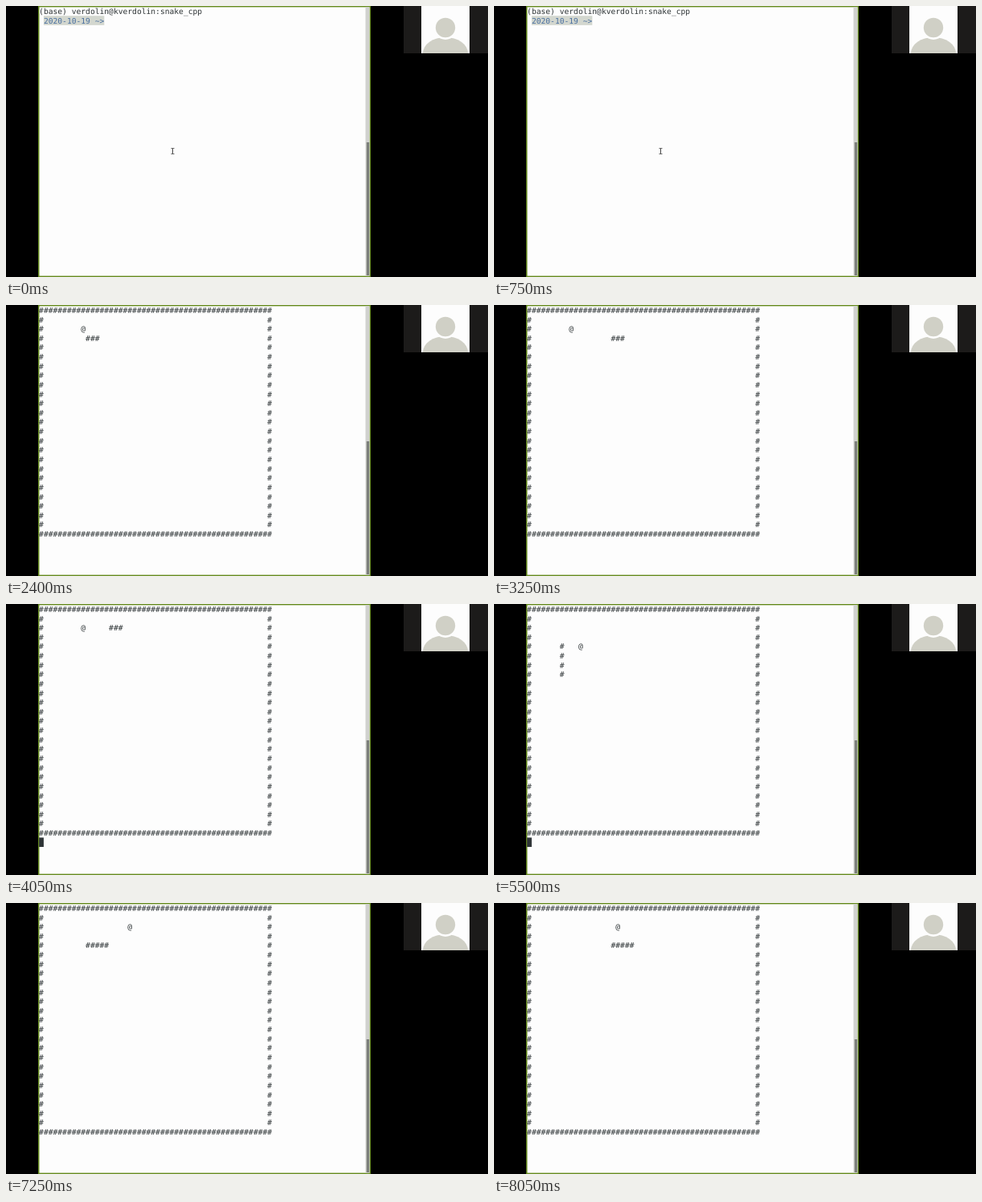
Animation of 600 by 338 pixels, one loop 8.1 s. Source, as an HTML page with a canvas:

```html
<!DOCTYPE html>
<html lang="en">
<head>
<meta charset="utf-8">
<title>Terminal snake</title>
<style>
html, body { margin: 0; height: 100%; overflow: hidden; background: #000; }
canvas { display: block; }
</style>
</head>
<body>
<canvas id="stage" width="600" height="338"></canvas>
<script>
const ctx = document.getElementById('stage').getContext('2d');
const LOOP = 8100, TICK = 50;
const CELL_W = 5.8, CELL_H = 11.63, LEFT = 41.1, TOP = 0.6;
const COLS = 50, ROWS = 25;
const INK = '#2e3436';

const HOST_LINE = '(base) verdolin@kverdolin:snake_cpp';
const PROMPT = '2020-10-19 ~>';
const COMMAND = './snake';
const KEY_TIMES = [1050, 1150, 1200, 1300, 1400, 1500, 1600];
const GAME_START = 1900;

// Snake pace: the head stands on the first corner below at ORIGIN.
const STEP = 108, ORIGIN = 1874;
const TURNS = [[8, 3], [21, 3], [21, 2], [7, 2], [7, 10], [8, 10], [8, 4], [30, 4]];
const FOODS = [[9, 2], [11, 4], [19, 2]];

// Head cells in order, starting with the two cells of the initial tail.
const trail = [[6, 3], [7, 3], TURNS[0]];
for (const [x, y] of TURNS.slice(1)) {
  let [cx, cy] = trail[trail.length - 1];
  while (cx !== x || cy !== y) {
    cx += Math.sign(x - cx);
    cy += Math.sign(y - cy);
    trail.push([cx, cy]);
  }
}
const mealAt = FOODS.slice(0, 2).map(([x, y]) =>
  trail.findIndex(c => c[0] === x && c[1] === y));

function rect(x, y, w, h, color) {
  ctx.fillStyle = color;
  ctx.fillRect(x, y, w, h);
}

function disc(x, y, rx, ry, color) {
  ctx.fillStyle = color;
  ctx.beginPath();
  ctx.ellipse(x, y, rx, ry, 0, 0, Math.PI * 2);
  ctx.fill();
}

function put(text, col, row, color = INK) {
  ctx.fillStyle = color;
  [...text].forEach((ch, i) =>
    ctx.fillText(ch, LEFT + (col + i) * CELL_W, TOP + row * CELL_H + 9.3));
}

function block(col, row, width, color) {
  rect(LEFT + col * CELL_W, TOP + row * CELL_H, width * CELL_W, CELL_H, color);
}

function drawWindow() {
  rect(0, 0, 600, 338, '#000');
  rect(40, 0, 414, 338, '#668b1e');
  rect(41.5, 1.4, 411, 335.2, '#fdfdfd');
  rect(447.5, 1.4, 5, 335.2, '#d0d1ce');
  rect(448.8, 170, 3.4, 166, '#7c7f7b');
}

function drawTile() {
  rect(495, 0, 105, 59, '#1c1b1a');
  rect(517, 0, 60, 59, '#fdfdfd');
  ctx.save();
  ctx.beginPath();
  ctx.rect(517, 0, 60, 59);
  ctx.clip();
  disc(547, 59, 28, 20, '#d0d0c6');
  disc(547, 27, 15, 15, '#fdfdfd');
  disc(547, 27, 12.2, 12.2, '#d0d0c6');
  ctx.restore();
}

function drawPointer() {
  rect(207, 177.5, 1, 7, '#444');
  rect(205.5, 177, 4, 1, '#666');
  rect(205.5, 184, 4, 1, '#666');
}

function drawShell(t, blink) {
  const typed = KEY_TIMES.filter(k => k <= t).length;
  put(HOST_LINE, 0, 0);
  block(1, 1, PROMPT.length, '#d3d7cf');
  put(PROMPT, 1, 1, '#4a6f9f');
  put(COMMAND.slice(0, typed), 15, 1);
  if (typed || blink) block(15 + typed, 1, 1, INK);
  if (!typed) drawPointer();
}

function drawGame(t, blink) {
  const wall = '#'.repeat(COLS);
  put(wall, 0, 0);
  put(wall, 0, ROWS - 1);
  for (let r = 1; r < ROWS - 1; r++) {
    put('#', 0, r);
    put('#', COLS - 1, r);
  }
  const head = 2 + Math.floor((t - ORIGIN) / STEP);
  const eaten = mealAt.filter(i => i <= head).length;
  put('@', ...FOODS[eaten]);
  for (const [x, y] of trail.slice(head - 2 - eaten, head + 1)) put('#', x, y);
  if (blink) block(0, ROWS, 1, INK);
}

function draw(t) {
  const phase = t % 1200;
  const blink = phase >= 150 && phase < 750;
  ctx.font = '9.634px "DejaVu Sans Mono", monospace';
  ctx.textRendering = 'geometricPrecision';
  drawWindow();
  drawTile();
  if (t < GAME_START) drawShell(t, blink);
  else drawGame(t, blink);
}

const start = performance.now();
function frame() {
  const t = (performance.now() - start) % LOOP;
  draw(Math.floor(t / TICK) * TICK);
  requestAnimationFrame(frame);
}
frame();
</script>
</body>
</html>
```
